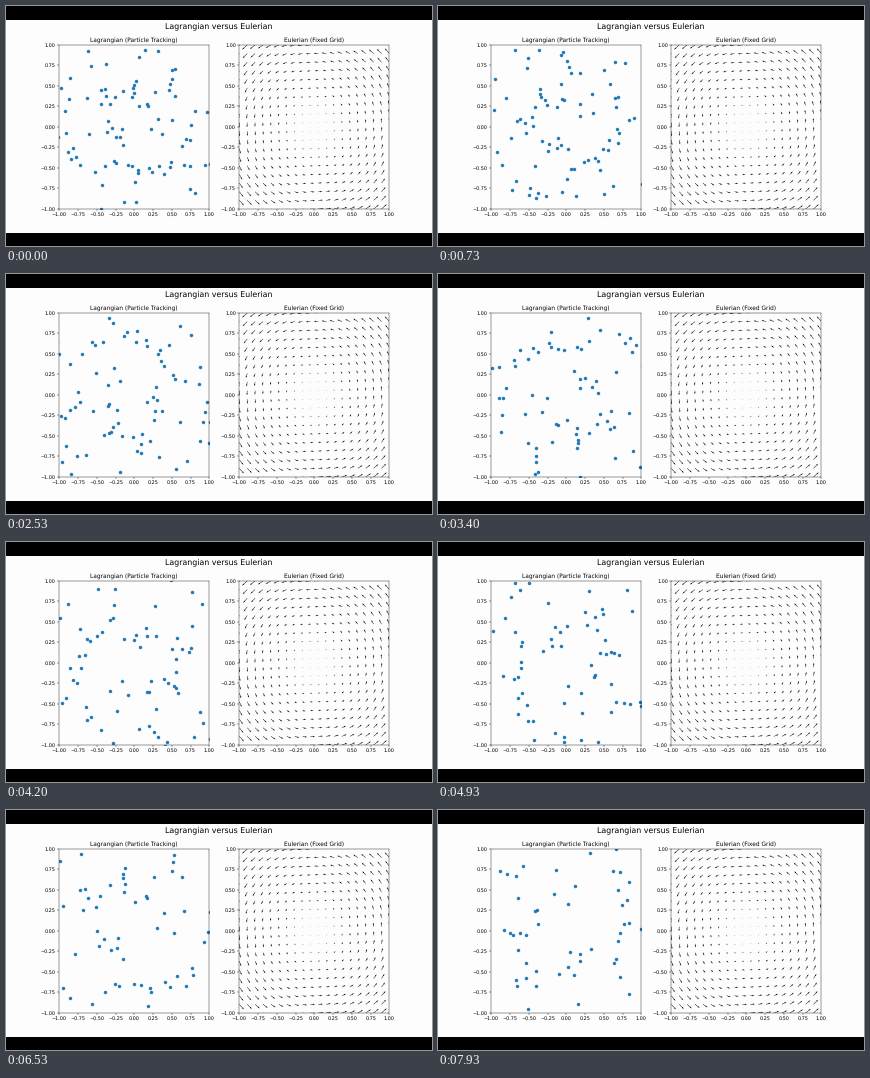
Animation of 426 by 240 pixels, one loop 8000 ms. Source, as a matplotlib script:

```python
import numpy as np
import matplotlib.pyplot as plt
from matplotlib.animation import FuncAnimation
from matplotlib.patches import Rectangle

W, H, DPI = 426, 240, 35.5
BAR, PAGE = 13, 213          # lower black bar and white page height, px
FRAMES, FPS = 120, 15
DT = 0.1                     # Euler step, ten steps per second
PAPER = "#fdfdfe"

# Key particles near the centre; the outer ring is random
CORE = [
    (.02, .56), (-.01, .51), (-.02, .48), (-.01, .42), (-.03, .36),
    (-.15, .44), (-.26, .37), (-.32, .28), (-.35, .07), (-.30, -.01),
    (-.36, -.06), (-.17, -.03), (-.25, -.12), (-.19, -.12), (-.15, -.22),
    (.06, .25), (.17, .28), (.18, .26), (.28, .43), (.22, -.02),
    (.37, -.09), (.31, .10), (-.09, -.46), (-.03, -.48), (.05, -.52),
    (.33, -.47),
]
RING = 64

rng = np.random.default_rng(7)
ring = rng.uniform(0.5, 1.2, RING) * np.exp(2j * np.pi * rng.random(RING))
start = np.concatenate([[complex(x, y) for x, y in CORE], ring])


def page_y(f):
    """Height on the white page as a fraction of the whole stage."""
    return (BAR + 0.6 + f * PAGE) / H


def positions(step):
    """Explicit Euler on u = (-y, x): each step turns and slightly expands."""
    z = start * (1 + 1j * DT) ** step
    return np.column_stack([z.real, z.imag])


plt.rcParams["font.family"] = "DejaVu Sans"
plt.rcParams["text.hinting"] = "none"

fig, (left, right) = plt.subplots(1, 2, figsize=(W / DPI, (H + 0.01) / DPI),
                                  dpi=DPI, facecolor="black")
fig.subplots_adjust(left=0.125, right=0.9, wspace=0.2,
                    bottom=page_y(0.11), top=page_y(0.88))
fig.add_artist(Rectangle((0, BAR / H), 1, PAGE / H, color=PAPER, lw=0,
                         transform=fig.transFigure, zorder=-1))
fig.suptitle("Lagrangian versus Eulerian", fontsize=16, y=page_y(0.985))

dots = left.scatter(start.real, start.imag, color="C0")

grid = np.linspace(-1, 1, 20)
gx, gy = np.meshgrid(grid, grid)
right.quiver(gx, gy, -gy, gx)

for ax, title in ((left, "Lagrangian (Particle Tracking)"),
                  (right, "Eulerian (Fixed Grid)")):
    ax.set(xlim=(-1, 1), ylim=(-1, 1), title=title, facecolor=PAPER)
    ax.set_xticks(np.linspace(-1, 1, 9))
    ax.set_yticks(np.linspace(-1, 1, 9))


def update(i):
    dots.set_offsets(positions((2 * i + 2) // 3))
    return (dots,)


anim = FuncAnimation(fig, update, frames=FRAMES, interval=1000 / FPS,
                     repeat=True, repeat_delay=0)
plt.show()
```
